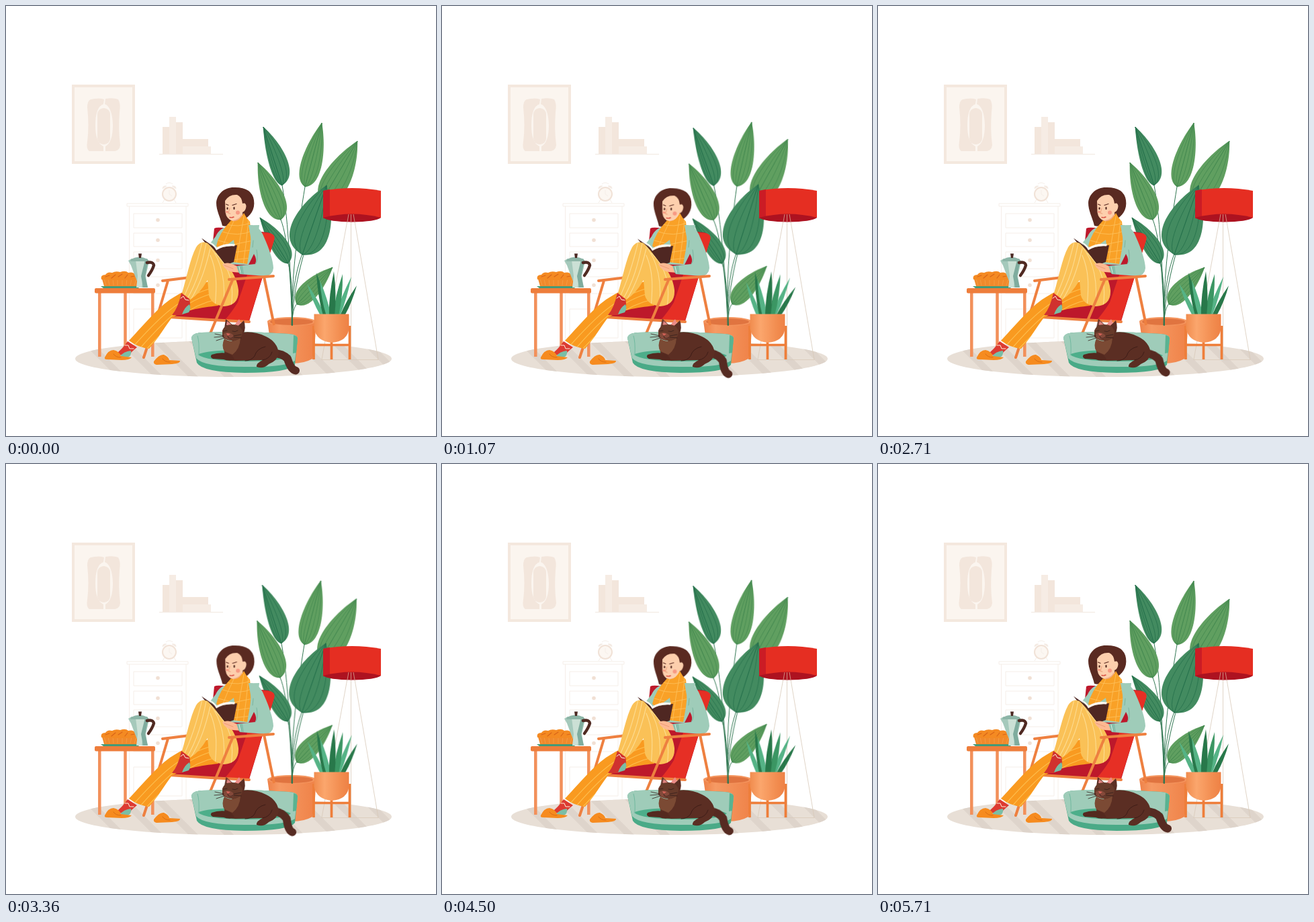
Write an HTML page that moves like this. It is 640 px wide and 640 px high and loops after 5.78 s.

```html
<!DOCTYPE html>
<html lang="en">
<head>
<meta charset="utf-8">
<title>Reading at home</title>
<style>
html,body{margin:0;width:100%;height:100%;overflow:hidden;background:#fff}
svg{display:block;width:100vw;height:100vh}
.sway,.nod,.dip,.tail,.ear{animation:5780ms cubic-bezier(.37,0,.63,1) infinite}
.sway{animation-name:sway}
.nod{animation-name:nod;transform-origin:345px 320px}
.dip{animation-name:dip}
.tail{animation-name:tail;transform-origin:402px 521px}
.ear{animation-name:ear;animation-duration:1926.67ms;transform-origin:335px 480px}
#plant{--turn:-1.8deg;transform-origin:426px 475px}
@keyframes sway{0%,45.9%,53.6%,100%{transform:rotate(0deg)}20.8%,26%,70.9%,76.1%{transform:rotate(var(--turn))}}
@keyframes nod{0%,45.9%,53.6%,100%{transform:translate(0,0) rotate(0deg)}20.8%,26%,70.9%,76.1%{transform:translate(1.1px,1.4px) rotate(1.8deg)}}
@keyframes dip{0%,45.9%,53.6%,100%{transform:translateY(0)}20.8%,26%,70.9%,76.1%{transform:translateY(.9px)}}
@keyframes tail{0%,38.9%,100%{transform:rotate(0deg)}16.4%,54.3%,64.9%{transform:rotate(11.5deg)}}
@keyframes ear{0%,100%{transform:rotate(0deg)}50%{transform:rotate(4deg)}}
.line{fill:none;stroke-linecap:round;stroke-linejoin:round}
</style>
</head>
<body>
<svg viewBox="0 0 640 640">
<defs>
  <clipPath id="rugClip"><ellipse cx="338.500" cy="525" rx="235.500" ry="27"/></clipPath>
  <clipPath id="backLegClip"><path id="backLeg" d="M304 409C283 416 262 425 244 437C222 453 203 477 183 498Q196 508 213 510C227 494 237 477 246 465C262 453 290 449 316 446Z"/></clipPath>
  <clipPath id="frontLegClip"><path id="frontLeg" d="M262 427C269 404 274 376 283 359Q290 348 300 353C309 361 317 373 325 383C337 391 345 410 346 423Q347 445 325 447Q306 445 302 431L300 408Q288 429 274 437Z"/></clipPath>
  <clipPath id="scarfClip"><path id="scarf" d="M335 319Q346 324 354 308Q358 316 363 321Q366 343 363 362L359 384L337 381Q342 360 339 348Q328 356 319 363L313 357Q317 338 335 319Z"/></clipPath>
  <linearGradient id="potShade"><stop stop-color="#ee8148"/><stop offset=".25" stop-color="#f69a64"/><stop offset="1" stop-color="#ef8248"/></linearGradient>
  <linearGradient id="bowlShade"><stop stop-color="#f08c4e"/><stop offset=".3" stop-color="#fba66d"/><stop offset=".75" stop-color="#f28d50"/><stop offset="1" stop-color="#ee8145"/></linearGradient>
</defs>

<!-- wall -->
<rect x="100" y="119" width="90" height="114" fill="#fbf5ef" stroke="#f4e8de" stroke-width="4"/>
<g fill="#f3e6dc">
  <path d="M126 139Q140 136 146 139L145 146Q133 150 133 178Q133 203 145 209V216H124Q119 213 121 202Q124 178 121 151Q121 141 126 139Z"/>
  <path d="M148 138Q160 136 167 139Q171 145 169 158Q167 183 170 207Q169 215 162 216H148V209Q159 203 159 177Q158 150 147 146Z"/>
  <rect x="136" y="152" width="19" height="54" rx="9"/>
  <path d="M233 180h10v40h-10zM253 173h10v47h-10z"/>
  <path fill="#f6ece4" d="M243 165h10v55h-10zM263 209h42v11h-42z"/>
  <path d="M263 198h38v11h-38z"/>
</g>
<path d="M228 220.700H323" stroke="#f0e6de"/>
<g fill="none" stroke="#f5eee8">
  <circle cx="243" cy="280" r="10" fill="#fcf7f2" stroke="#f1e2d7" stroke-width="2"/>
  <path d="M243 274V280L247 283M236 288L233 293M250 288L253 293M238 265Q243 261 248 265"/>
  <path d="M233 272Q233 267 239 268ZM247 268Q253 267 253 272Z" fill="#f4e8de"/>
  <path d="M180 294H271V298H180ZM183.500 298V503H268V298M190 309H262V330H190ZM190 338H262V358H190ZM190 366H262V391H190ZM190 403H262V428H190ZM190 451H262V494H190Z"/>
  <g fill="#f1e0d4" stroke="none"><circle cx="226" cy="318.500" r="2.800"/><circle cx="226" cy="348.500" r="2.800"/><circle cx="226" cy="378.500" r="2.800"/><circle cx="226" cy="415.500" r="2.800"/></g>
</g>

<!-- rug -->
<g clip-path="url(#rugClip)">
  <path d="M100 496H576V554H100Z" fill="#e8dfd6"/>
  <path d="M115 495L178 558M170 495L233 558M222 495L285 558M275 495L338 558M380 495L443 558M432 495L495 558M485 495L548 558M530 495L593 558" stroke="#ded4cb" stroke-width="10"/>
</g>

<!-- table -->
<g stroke="#f2905a" stroke-width="4.500"><path d="M139.300 425V522M177.500 425V513M218.300 425V522"/></g>
<rect x="132" y="420" width="90" height="7.500" rx="2" fill="#ee7d3b"/>
<path d="M141 417H200L197 420H145Z" fill="#439a78"/>
<path d="M142 403H200L197 417H146Z" fill="#f08a2c"/>
<path d="M146 406L149 416M152 406L154 416M159 406L160 416M166 406V416M173 406V416M180 406L179 416M187 406L185 416M194 406L191 416" stroke="#f7a046" stroke-width=".8"/>
<path d="M142 407Q140 400 148 400Q151 395 158 397Q163 394 170 396Q178 393 182 397Q189 395 193 400Q201 399 199 407Q170 409 142 407Z" fill="#f48a22"/>
<path class="line" d="M148 403L154 401M157 405L163 400M167 403L173 399M177 405L181 400M186 403L191 402" stroke="#d96518" stroke-width="1.200"/>
<path d="M182 379L187 376H210L213 380L208 402L211 419H199L192 402L186 386Z" fill="#a5c9bb"/>
<path d="M193 378L196 402L194 419H202L204 402L207 378Z" fill="#cbe0d5"/>
<path d="M207 378H212L207 402L211 419H204L201 402Z" fill="#7fac9e"/>
<path d="M186 377Q198 370 211 377V380H185Z" fill="#8db5a7"/>
<path d="M197 368.500H202L201 375H198Z" fill="#4c2923"/>
<path class="line" d="M210 382Q219 380 220 386Q218 393 212 401" stroke="#502a22" stroke-width="4.500"/>

<!-- big plant -->
<path d="M389 469Q425 457 461 469Q461 503 456 525Q444 532 426 532Q405 532 397 525Z" fill="url(#potShade)"/>
<ellipse cx="425" cy="469.500" rx="36" ry="6.500" fill="#f5965f"/>
<ellipse cx="425" cy="470" rx="32" ry="5" fill="#e07440"/>
<g id="plant" class="sway">
  <path class="line" d="M426 475C424 410 421 320 411 267M426 475C424 400 435 330 445 269M426 475C426 420 446 350 472 286M426 475C424 410 420 345 409 318M425 475C426 430 426 405 420 383M426 475C425 430 431 395 441 369M426 475C426 456 429 448 433 443" stroke="#2f7650" stroke-width="1"/>
</g>

<!-- lamp -->
<path class="line" d="M513.500 309V526M510 309L470 526M517 309L554 526M470 526.500H554" stroke="#d8c9b9" stroke-width=".8"/>
<path d="M472 275Q515 267 558 275V315Q515 326 472 315Z" fill="#e52e22"/>
<path d="M472 275L482 273V316H472Z" fill="#cb1c25"/>
<path d="M472 315Q515 304 558 315Q550 321 515 321.500Q480 321 472 315Z" fill="#ad1220"/>
<path d="M510 310L508 321M513.500 310V321M517 310L519 321" stroke="#dba893" stroke-width=".8"/>

<!-- small plant -->
<g id="spikes"></g>
<path class="line" d="M458 476V526M511.500 476V526M484.500 500V526M458 504.500H511.500" stroke="#ee7e3a" stroke-width="3.700" style="stroke-linecap:butt"/>
<path d="M458.500 458.500H510.500V479Q509 499 485 501Q462 499 458.500 480Z" fill="url(#bowlShade)"/>

<!-- chair -->
<path d="M384 403L399 475" stroke="#ee8040" stroke-width="4"/>
<path d="M310 331Q313 329 322 330L390 337Q399 339 399 347L362 469L305 466L240 463L300 425Z" fill="#bd182b"/>
<path d="M379 337L392 338Q402 340 399 349L361 470L325 468Q336 456 345 441L358 403Z" fill="#e62f25"/>
<path class="line" d="M298 401L233 409M241 409L224 466L205 523M243 463L305 467L362 470" stroke="#ee8040" stroke-width="4"/>

<!-- head -->
<g class="nod">
  <path d="M341 270C326 269 314 279 313 293C313 305 319 314 322 327Q331 330 338 320L352 319C364 313 371 303 369 289Q366 270 341 270Z" fill="#5a2a21"/>
  <path d="M326 290Q332 280 344 281Q351 284 352 294Q357 292 357.500 298Q357 305 352 307L353 321L338 325L337 320Q328 317 326.500 307Z" fill="#fdcfad"/>
  <path d="M338 319Q347 318 351 310L352 320L340 325Z" fill="#f2aa82"/>
  <circle cx="345" cy="307.500" r="3" fill="#f79983"/>
  <circle cx="329" cy="306.500" r="1.800" fill="#f79983"/>
  <path class="line" d="M327.500 295L331 296.500M337 296.500L343 294.500" stroke="#5a2a21" stroke-width="1.200"/>
  <path class="line" d="M329.500 300.500V302M339.500 300V302" stroke="#482018" stroke-width="2"/>
  <path class="line" d="M333 301L331 308.500L334 309" stroke="#eaa07c"/>
  <path class="line" d="M333 314.500Q336 315.500 339 314" stroke="#d94e43" stroke-width="1.400"/>
</g>

<!-- torso -->
<path d="M335 327Q318 329 312 343L304 353L323 384L371 386L377 326Z" fill="#9fccb9"/>
<use href="#scarf" fill="#f9a127"/>
<g clip-path="url(#scarfClip)"><path class="line" d="M325 324Q345 331 366 322M319 335Q345 345 368 334M312 348L336 354M338 355L368 349M337 367L366 363M336 378L365 375M340 318Q329 340 320 364M354 313Q347 350 343 384M361 318Q358 350 353 386" stroke="#fdc05a" stroke-width=".9"/></g>
<path d="M361 326Q377 325 384 344Q397 373 398 390Q397 401 386 402L348 399L344 387L371 384L366 355Z" fill="#9fccb9"/>
<path d="M369 369Q374 377 371 384L361 385Z" fill="#bd182b"/>
<path class="line" d="M371 384Q376 379 373 363M368 349L367 359" stroke="#78b49f"/>
<g class="dip">
  <path d="M291 345.500L312 360L344 356L339 381L326 386L304 362Z" fill="#4f2722"/>
  <path d="M299 349Q309 353 313.500 359.500Q325 352 341 354.500L340 357.500Q325 356 313 363.500Q309 356 299 349Z" fill="#fffaf3"/>
</g>

<!-- legs -->
<use href="#backLeg" fill="#f99a20"/>
<g clip-path="url(#backLegClip)"><path class="line" d="M310 419C258 432 226 466 190 506M311 427C265 438 233 471 198 511M313 437C269 446 243 475 206 514" stroke="#fdc050" stroke-width="1.200"/></g>
<use href="#frontLeg" fill="#fac157"/>
<g clip-path="url(#frontLegClip)"><path class="line" d="M292 351C285 380 277 408 264 434M298 353C292 384 285 410 269 437M304 361C297 390 290 412 275 437M304 358C321 380 328 412 323 448M304 371C314 394 314 416 311 448M312 368C334 390 340 415 335 448" stroke="#fddc91" stroke-width="1.100"/></g>
<path d="M261 427L273 436Q275 444 273 454L261 460L247 460Q256 450 261 427Z" fill="#d0322f"/>
<path d="M273 444Q276 450 272 456L262 459Q265 449 273 444Z" fill="#79bda5"/>
<path class="line" d="M260 435L264 432L267 437L272 438" stroke="#fff2dc"/>
<path d="M181 499L195 508Q186 515 183 520L162 519Q173 511 181 499Z" fill="#dd3b32"/>
<path d="M186 513Q187 521 181 523L169 522Q175 514 186 513Z" fill="#7abea6"/>
<path class="line" d="M177 505L182 505L184 510L190 510" stroke="#fff2dc"/>
<path d="M147 523Q152 512 160 512Q169 514 171 521L187 523Q184 527 172 527L150 526Q146 526 147 523Z" fill="#f68b1f"/>
<path d="M220 529Q228 518 235 519Q242 522 243 527L259 528Q260 532 247 533L224 534Q219 533 220 529Z" fill="#f68b1f"/>
<path class="line" d="M160 518Q163 523 171 523M233 525Q236 530 244 530" stroke="#d96e15"/>

<!-- hands and armrest -->
<path d="M322 384Q331 380 341 386L347 388L350 397L338 396Q326 394 322 384Z" fill="#fdb992"/>
<path class="line" d="M325 386L338 391" stroke="#ed9c76"/>
<path d="M343 387L352 386L354 399L347 398Z" fill="#86bda9"/>
<path class="line" d="M347 388L349 397" stroke="#dbeee5"/>
<path class="line" d="M332 407L398 402" stroke="#ee8040" stroke-width="4"/>
<path class="line" d="M337 408L300 497" stroke="#ee8040" stroke-width="4"/>

<!-- cat bed -->
<path d="M276 494Q277 487 291 486Q355 483 421 488Q434 489 434 495L430 534Q421 546 355 546Q292 545 284 531Z" fill="#4aaa87"/>
<path d="M276 494Q277 487 291 486Q355 483 421 488Q434 489 434 495L430 528Q416 538 355 537Q293 537 283 524Z" fill="#9fccb9"/>
<path d="M286 519Q296 512 354 512Q410 512 424 520Q417 529 355 529Q297 528 286 519Z" fill="#4dae8a"/>
<path d="M285 491Q288 500 287 519" class="line" stroke="#70b99f"/>
<path d="M428 490Q434 491 434 495L432 516L427 517Z" fill="#59b391"/>

<!-- cat -->
<path class="tail line" d="M395 517Q411 516 419 525Q424 541 431 542.500" stroke="#562b22" stroke-width="12"/>
<path d="M345 487Q367 482 387 492Q404 500 406 517Q404 528 391 533Q383 541 373 537Q372 532 382 527L341 528Q325 527 325 514Z" fill="#5b2e23"/>
<path d="M325 495Q335 503 349 494Q348 511 337 519L325 514Q320 506 325 495Z" fill="#7b4a34"/>
<path d="M306 519Q317 515 330 517Q339 520 340 527Q330 529 324 526L308 525Q303 523 306 519Z" fill="#54291f"/>
<path class="line" d="M386 507Q373 510 370 521Q365 528 356 528M382 527Q393 525 396 515" stroke="#3e1d18" stroke-width="1"/>
<g class="ear">
  <path d="M325 480L327 466L339 476Z" fill="#5b2e23"/>
  <path d="M328 475L329 469L338 476Z" fill="#e28784"/>
</g>
<path d="M339 476L347 466L350 473L342 479Z" fill="#eb8c87"/>
<path d="M343 478Q348 474 354 468Q358 479 353 489Z" fill="#5b2e23"/>
<path d="M322 483Q325 474 337 474Q350 474 352 485Q352 495 341 498Q327 499 322 492Z" fill="#673a2a"/>
<path d="M324 488Q330 484 336 488Q340 490 338 494Q330 499 324 493Z" fill="#84493a"/>
<path d="M328 487L334 488L330 491Z" fill="#d56358"/>
<path class="line" d="M324 484L329 483M337 484Q341 486 345 483M330 491L331 494Q335 496 338 493M324 491L311 488M324 492L310 493M325 494L313 498M339 491L350 489M339 493L350 494" stroke="#35201c" stroke-width=".8"/>
</svg>

<script>
const ns = 'http://www.w3.org/2000/svg';
const plant = document.getElementById('plant');
const spikes = document.getElementById('spikes');

function add(parent, name, attrs) {
  const node = document.createElementNS(ns, name);
  for (const key in attrs) node.setAttribute(key, attrs[key]);
  return parent.appendChild(node);
}

// Half widths are those on screen, left and right of the midrib.
function leaf(tipX, tipY, baseX, baseY, left, right, dark) {
  const dx = baseX - tipX, dy = baseY - tipY, len = Math.hypot(dx, dy);
  const angle = Math.atan2(dy, dx) * 180 / Math.PI;
  const group = add(plant, 'g', {transform: `translate(${tipX} ${tipY}) rotate(${angle})`});
  const shape = k => {
    const a = left * k, b = right * k;
    return `M0 0C${len * .3} ${a * .9} ${len * .92} ${a * 1.7} ${len} 0C${len * .92} ${-b * 1.7} ${len * .3} ${-b * .9} 0 0`;
  };
  add(group, 'path', {d: shape(1), fill: dark ? '#438b60' : '#609f60'});
  const veins = {fill: 'none', stroke: dark ? '#236f4a' : '#42884f', 'stroke-width': .7};
  for (const k of [.35, .7]) add(group, 'path', {d: shape(k), ...veins});
  add(group, 'path', {d: `M0 0H${len}`, ...veins, 'stroke-width': 1});
}

leaf(383, 180, 411, 267, 9, 19, true);
leaf(470, 174, 445, 269, 15, 16, false);
leaf(523, 201, 470, 290, 18, 23, false);
leaf(375, 233, 409, 318, 15, 18, false);
leaf(378, 315, 420, 383, 10, 16, true);
leaf(477, 267, 441, 370, 30, 28, true);
leaf(486, 389, 433, 444, 15, 13, false);

function spike(tipX, tipY, baseX, width, turn, color) {
  const midX = tipX * .45 + baseX * .55, midY = tipY * .45 + 460 * .55;
  const side = s => `${midX + s * width} ${midY}`;
  const d = `M${tipX} ${tipY}Q${side(1)} ${baseX + width * .7} 460H${baseX - width * .7}Q${side(-1)} ${tipX} ${tipY}`;
  add(spikes, 'path', {d, fill: color, class: 'sway',
    style: `--turn:${turn}deg;transform-origin:${baseX}px 462px`});
}

const deep = '#28784a', mid = '#3b9663', pale = '#55b386';
spike(448, 413, 471, 5, 5.5, pale);
spike(514, 403, 494, 5, 4, pale);
spike(522, 416, 501, 5, 5.5, deep);
spike(462, 397, 476, 6, 3.5, deep);
spike(467, 408, 480, 5, 3, pale);
spike(501, 399, 491, 6, 2.5, mid);
spike(488, 395, 485, 6, 2, deep);
</script>
</body>
</html>
```
